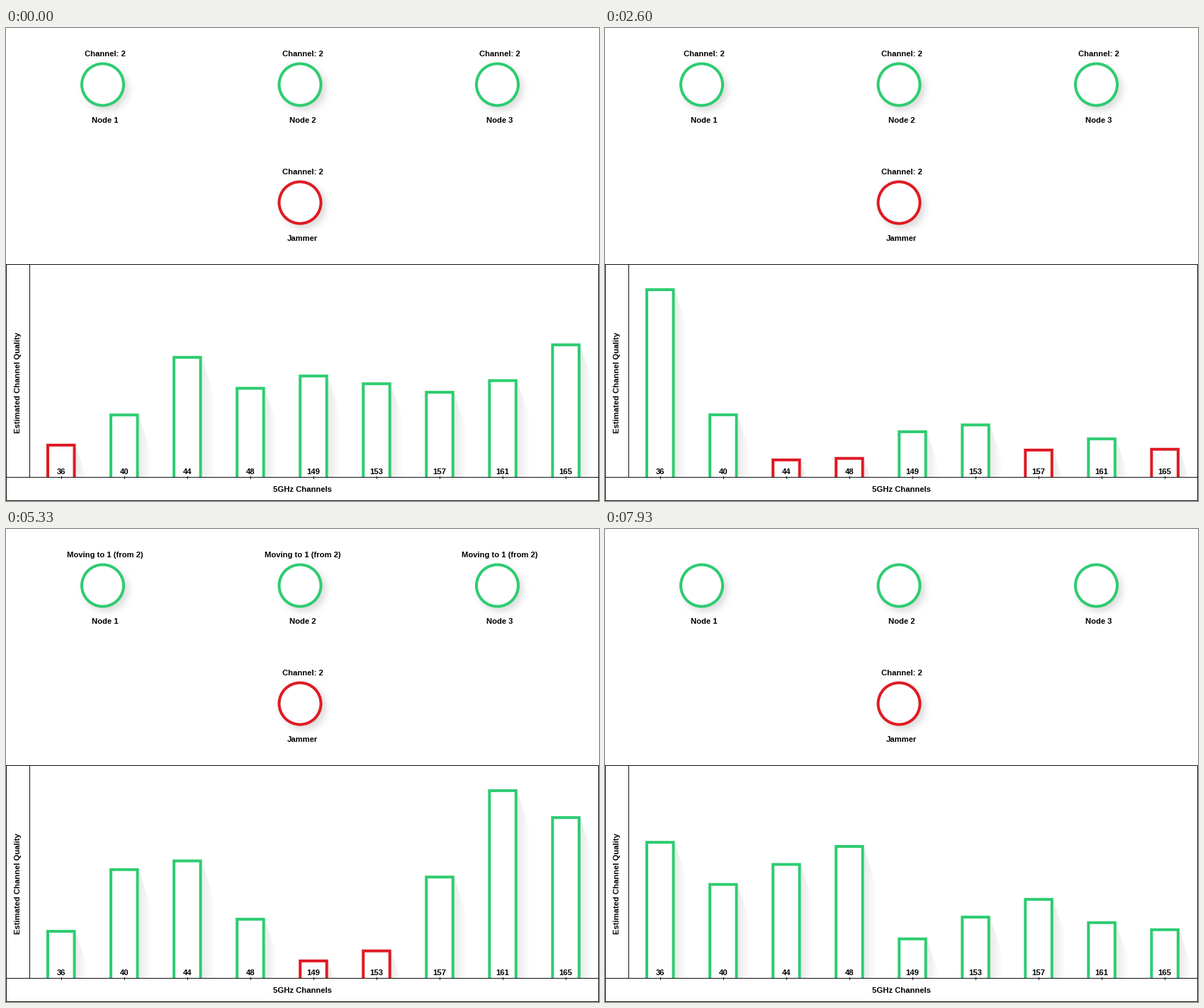
A matplotlib script for the animation above (8 s loop, 837x669 px).

```python
import matplotlib.pyplot as plt
import numpy as np
from matplotlib.animation import FuncAnimation
from matplotlib.path import Path
from matplotlib.patches import Circle

W, H, DPI = 837, 669, 64
PT = 72 / DPI  # points per pixel
FRAMES, INTERVAL, RATE = 200, 40, 15

GREEN, RED, INK = "#2ecc71", "#de1b24", "#111111"
BASE, POOR = 635.5, 18
BAR_X, BAR_STEP, BAR_W, STROKE = 57, 89.05, 41.5, 4
SHADOW_W = 18
CHANNELS = (36, 40, 44, 48, 149, 153, 157, 161, 165)

PERIOD, LEAD, BLINK_START = 2, 0.47, 3.78


def scan(*peaks, width=1):
    """Quality per channel: a sum of (position, size) peaks scaled to 10..90."""
    i = np.arange(len(CHANNELS))
    q = sum(size * np.exp(-((i - pos) / width) ** 2) for pos, size in peaks)
    return 10 + 80 * (q - q.min()) / np.ptp(q)


scans = [
    np.linspace(10, 90, len(CHANNELS)),
    scan((0, 14), (2, 76), (4.2, 38), (8.8, 47)),
    scan((-0.15, 82), (4.6, 20), (7.2, 11)),
    scan((1.6, 55), (7.3, 86), width=1.6),
    scan((0.15, 82), (2.8, 42), (6.55, 40)),
    scan((0.5, 30), (2.5, 95), (5.3, 56), (8.8, 70)),
]

plt.rcParams["font.family"] = "Liberation Sans"
fig = plt.figure(figsize=(W / DPI, H / DPI), dpi=DPI, facecolor="white")
ax = fig.add_axes([0, 0, 1, 1])
ax.axis("off")


def label(x, y, text, **kw):
    kw = {"va": "baseline", **kw}
    return ax.text(x, y, text, size=11.2 * PT, weight="bold", color="black",
                   ha="center", zorder=6, **kw)


def line(xs, ys):
    ax.plot(xs, ys, color=INK, lw=PT, solid_capstyle="butt",
            solid_joinstyle="miter", snap=False, zorder=5)


def black(alpha):
    rgba = np.zeros(alpha.shape + (4,))
    rgba[..., 3] = alpha
    return rgba


def node(x, y, color, name):
    r = np.arange(-50, 50) + 0.5
    dist = np.hypot(r[:, None] - 5.5, r[None, :] - 5.5)
    ax.imshow(black(0.14 / (1 + np.exp((dist - 31) / 3))),
              extent=(x - 50, x + 50, y + 50, y - 50), aspect="auto", zorder=1)
    ax.add_patch(Circle((x, y), 29.5, fc="white", ec=color, lw=STROKE * PT, zorder=2))
    label(x + 3.5, y + 54, name)
    return label(x + 3.5, y - 40, "Channel: 2")


node_labels = [node(136.5 + 278.5 * i, 80, GREEN, f"Node {i + 1}") for i in range(3)]
node(415, 247, RED, "Jammer")

line([0.5, 836.5, 836.5, 0.5, 0.5], [334.5, 334.5, 668.5, 668.5, 334.5])
line([33.5, 33.5], [334.5, BASE])
line([0.5, 836.5], [BASE, BASE])
label(418.5, 656, "5GHz Channels")
label(17, 502, "Estimated Channel Quality", rotation=90, va="center")

lefts = BAR_X + BAR_STEP * np.arange(len(CHANNELS))
bars, shadows = [], []
fade = black(0.08 * np.linspace(1, 0, SHADOW_W)[None, :])
for left, channel in zip(lefts, CHANNELS):
    mid, right = round(left + BAR_W / 2) + 0.5, left + BAR_W
    bars += ax.plot([], [], lw=STROKE * PT, solid_joinstyle="miter",
                    solid_capstyle="butt", snap=False, zorder=4)
    shadows.append(ax.imshow(fade, extent=(right, right + SHADOW_W, BASE, 360),
                             aspect="auto", interpolation="nearest", zorder=3))
    line([mid, mid], [634, 638])
    label(mid - 0.5, 631, channel)

ax.set_xlim(0, W)
ax.set_ylim(H, 0)


def draw_bar(bar, shadow, left, level):
    top = 639 - 3.01 * level
    right = left + BAR_W
    a, b, y = left + STROKE / 2, right - STROKE / 2, top + STROKE / 2
    bar.set_data([a, a, b, b], [BASE, y, y, BASE])
    bar.set_color(RED if level < POOR else GREEN)
    far, low = right + SHADOW_W, top + 3 + 3 * SHADOW_W
    floor = max(BASE, low)
    shape = Path([(right, top + 3), (far, low), (far, floor), (right, floor), (right, top + 3)])
    shadow.set_clip_path(shape, ax.transData)


def update(frame):
    t = round(frame * INTERVAL * RATE / 1000) / RATE

    # Each scan takes one second to blend in, then holds.
    k, age = divmod(t + LEAD, PERIOD)
    old, new = scans[int(k)], scans[int(k) + 1]
    levels = old + (new - old) * min(1, age)
    for parts in zip(bars, shadows, lefts, levels):
        draw_bar(*parts)

    moving = t >= BLINK_START
    for text in node_labels:
        text.set_text("Moving to 1 (from 2)" if moving else "Channel: 2")
        text.set_visible(not moving or (t - BLINK_START) % 1 >= 0.5)
    return bars + shadows + node_labels


anim = FuncAnimation(fig, update, frames=FRAMES, interval=INTERVAL, repeat=True,
                     repeat_delay=0, blit=False)
plt.show()
```
